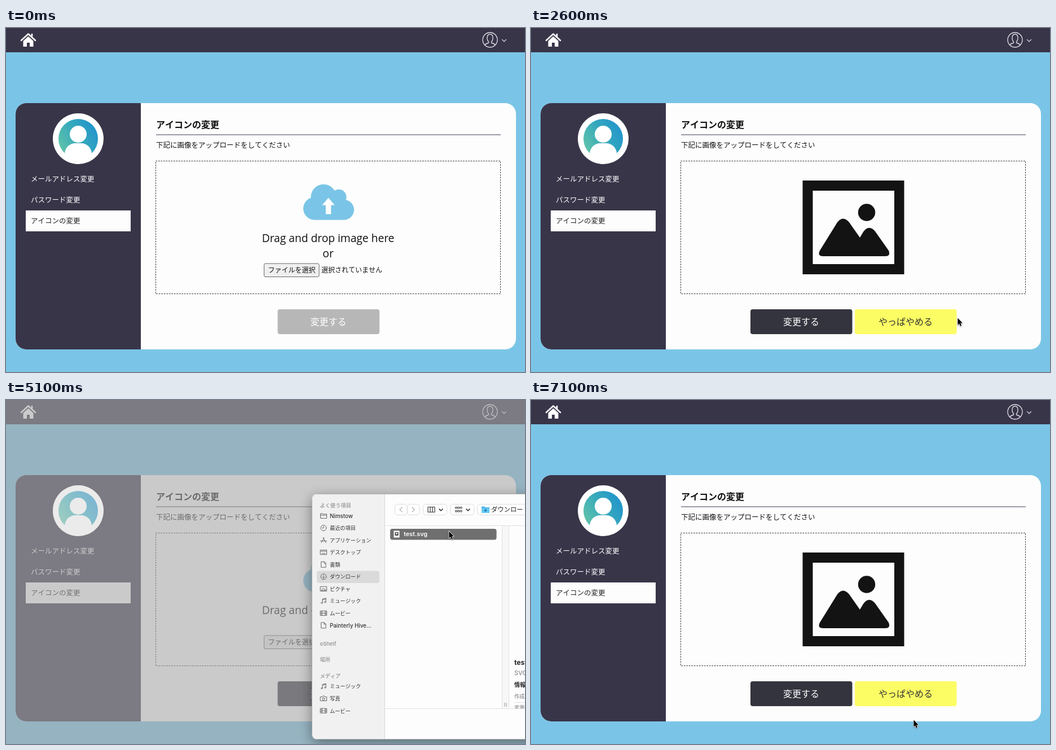
An HTML page with a canvas for the animation above (7.2 s loop, 920 by 609 pixels).

```html
<!DOCTYPE html>
<html lang="ja">
<head>
<meta charset="utf-8">
<title>アイコンの変更</title>
<style>
html, body { margin: 0; width: 920px; height: 609px; overflow: hidden; }
canvas { display: block; }
</style>
</head>
<body>
<canvas id="stage" width="920" height="609"></canvas>
<script>
const LOOP = 7200, STEP = 100;
const INK = '#393549', SKY = '#7ac5e7', PAPER = '#fdfdfd';
const CJK = '"Noto Sans CJK JP", "Noto Sans CJK", sans-serif';
const LATIN = 'Inter, "Noto Sans CJK JP", sans-serif';

const stage = document.getElementById('stage');
const main = stage.getContext('2d');
const sheet = document.createElement('canvas');
sheet.width = 920;
sheet.height = 609;
const sheetCtx = sheet.getContext('2d');
let c = main;

// Pointer route: time, x, y
const route = [
  [900, -20, 340], [1500, 363, 298], [1900, 560, 340], [2600, 756, 513],
  [2800, 700, 518], [3200, 690, 520], [3900, 525, 432], [4100, 519, 429],
  [4400, 519, 429], [4900, 785, 232], [5300, 785, 232], [5800, 925, 575],
  [7000, 681, 584], [7100, 678, 566]
];

const clamp = v => Math.max(0, Math.min(1, v));

function pointerAt(t) {
  let i = 0;
  while (i < route.length - 2 && t > route[i + 1][0]) i++;
  const [t0, x0, y0] = route[i], [t1, x1, y1] = route[i + 1];
  const p = clamp((t - t0) / (t1 - t0)), e = p * p * (3 - 2 * p);
  return [x0 + (x1 - x0) * e, y0 + (y1 - y0) * e];
}

function box(x, y, w, h, r, fill, line) {
  c.beginPath();
  c.roundRect(x, y, w, h, r);
  if (fill) { c.fillStyle = fill; c.fill(); }
  if (line) { c.strokeStyle = line; c.lineWidth = 1; c.stroke(); }
}

function disc(x, y, r, fill) {
  c.beginPath();
  c.arc(x, y, r, 0, 7);
  c.fillStyle = fill;
  c.fill();
}

function shape(d, x, y, fill, line, width = 1, scale = 1) {
  const path = new Path2D(d);
  c.save();
  c.translate(x, y);
  c.scale(scale, scale);
  c.lineJoin = c.lineCap = 'round';
  if (line) { c.strokeStyle = line; c.lineWidth = width; c.stroke(path); }
  if (fill) { c.fillStyle = fill; c.fill(path); }
  c.restore();
}

// y is the vertical middle of the line
function text(s, x, y, size, fill, { weight = 400, align = 'left', font = CJK } = {}) {
  c.font = `${weight} ${size}px ${font}`;
  c.textAlign = align;
  c.fillStyle = fill;
  c.fillText(s, x, y + size * 0.37);
}

function button(label, x, y, fill, ink) {
  box(x, y, 180.5, 44, 4, fill);
  text(label, x + 90, y + 22, 16, ink, { weight: 500, align: 'center' });
}

function header() {
  box(0, 0, 920, 43, 0, INK);
  shape('M1 13L13.5 1.5L26 13M20 2V6', 26, 9, null, '#fff', 2.6);
  shape('M4.5 14L13.5 5.7L22.5 14V24H16V17H11V24H4.5Z', 26, 9, '#fff');
  shape('M13 0A13 13 0 1 1 -13 0A13 13 0 1 1 13 0M-9 8.5Q-7 6.5 -3 5.5Q-2 5 -2.5 3.5Q-5.5 0 -5 -4.5Q-4.5 -10 0 -10Q4.5 -10 5 -4.5Q5.5 0 2.5 3.5Q2 5 3 5.5Q7 6.5 9 8.5',
    858, 21, null, '#e4e2ea', 1.3);
  shape('M0 0L3.5 3.5L7 0', 879.5, 20.5, null, '#d8d6de', 1.2);
}

function avatar(dim) {
  disc(128, 196, 45, '#fff');
  const g = c.createLinearGradient(97, 215, 158, 178);
  g.addColorStop(0, '#5fc2aa');
  g.addColorStop(0.55, '#35a8bd');
  g.addColorStop(1, '#2396cb');
  disc(128, 196, 35, g);
  disc(128, 188, 15, '#fff');
  box(104, 204, 48, 29, [19, 19, 0, 0], '#fff');
  if (dim) disc(128, 196, 45, `rgba(215,215,215,${dim * 0.5})`);
}

function sidebar(bottom) {
  box(17, 133, 222, bottom - 133, [19, 0, 0, 19], INK);
  text('メールアドレス変更', 44, 267, 12.5, '#fff', { weight: 500 });
  text('パスワード変更', 44, 304, 12.5, '#fff', { weight: 500 });
  box(35, 323, 186, 37, 0, PAPER);
  text('アイコンの変更', 44, 341, 12.5, '#222');
}

function dropZone(over) {
  c.save();
  c.setLineDash(over ? [6, 3] : [2.7, 1.8]);
  c.strokeStyle = over ? '#d8edf9' : '#333';
  c.lineWidth = over ? 3 : 1;
  if (over) c.strokeRect(266.5, 236.5, 609.5, 236);
  else c.strokeRect(265.5, 235.5, 611, 235);
  c.restore();
}

function uploadPrompt(dy, hover) {
  shape('M537.6 226.6c4.1-10.7 6.4-22.4 6.4-34.6 0-53-43-96-96-96-19.7 0-38.1 6-53.3 16.2C367 64.2 315.3 32 256 32c-88.4 0-160 71.6-160 160 0 2.7.1 5.4.2 8.1C40.2 219.8 0 273.2 0 336c0 79.5 64.5 144 144 144h368c70.7 0 128-57.3 128-128 0-61.9-44-113.6-102.4-125.4z',
    527, 272.3 + dy, SKY, null, 1, 0.1406);
  shape('M0 0L11 13H4.7V29H-4.7V13H-11Z', 571.5, 300.5 + dy, '#fff');
  const opts = { align: 'center', font: '"Open Sans", "Noto Sans", sans-serif' };
  text('Drag and drop image here', 571, 372 + dy, 19.2, '#111', opts);
  text('or', 571, 399 + dy, 19.2, '#111', opts);
  box(457.5, 417 + dy, 97.5, 23.5, 2.5, hover ? '#dedede' : '#efefef', '#666');
  text('ファイルを選択', 506.5, 428.5 + dy, 12, '#111', { align: 'center' });
  text('選択されていません', 559, 428.5 + dy, 12, '#111');
}

function preview() {
  box(481.5, 270, 180, 166, 0, '#131313');
  box(499.5, 288, 144.5, 130, 0, PAPER);
  disc(595, 326.5, 15.2, '#131313');
  shape('M512 394L543 344Q553 331 564 344L583 371L589 361Q599 347 610 360L634 394Q638 404 628 404H518Q507 404 512 394Z', 0, 0, '#131313');
}

const icons = {
  folder: 'M-5.5 4V-4H-2L-1 -3H5.5V4ZM-5.5 -1H5.5',
  clock: 'M5 0A5 5 0 1 1 -5 0A5 5 0 1 1 5 0M0 -3V0H-2.5',
  app: 'M-4 4.5L0.8 -4.5M4 4.5L-0.8 -4.5M-5.5 1.5H5.5',
  desk: 'M-5.5 -4H5.5V4H-5.5ZM-5.5 -2H5.5M-3 2H3',
  doc: 'M-4 -5H1L4 -2V5H-4ZM1 -5V-2H4',
  down: 'M5 0A5 5 0 1 1 -5 0A5 5 0 1 1 5 0M0 -2.5V2.5M-2 0.7L0 2.7L2 0.7',
  pic: 'M-5.5 -4H5.5V4H-5.5ZM-4 2.5L-1 -1L1 1L2.5 0L4 2.5Z',
  music: 'M-2 3.5V-3.5L4 -5V2M-2 3.5A1.3 1.2 0 1 1 -2 3.4M4 2A1.3 1.2 0 1 1 4 1.9M-2 -2L4 -3.5',
  film: 'M-5.5 -4H5.5V4H-5.5ZM-3 -4V4M3 -4V4M-3 0H3M-5.5 -1.4H-3M-5.5 1.4H-3M3 -1.4H5.5M3 1.4H5.5',
  camera: 'M-5.5 -3H-2.5L-1.5 -4.5H1.5L2.5 -3H5.5V4H-5.5ZM2.2 0.5A2.2 2.2 0 1 1 -2.2 0.5A2.2 2.2 0 1 1 2.2 0.5'
};
const places = [
  ['folder', 'Nimstow'], ['clock', '最近の項目'], ['app', 'アプリケーション'],
  ['desk', 'デスクトップ'], ['doc', '書類'], ['down', 'ダウンロード'],
  ['pic', 'ピクチャ'], ['music', 'ミュージック'], ['film', 'ムービー'],
  ['doc', 'Painterly Hive...']
];
const media = [['music', 'ミュージック'], ['camera', '写真'], ['film', 'ムービー']];

function fileIcon(x, y) {
  box(x, y, 10, 12, 1, '#fff', '#bbb');
  box(x + 2, y + 2.5, 6, 6, 0, '#444');
  disc(x + 5, y + 5, 1.4, '#fff');
}

function dialog(selected, closing) {
  c = sheetCtx;
  c.clearRect(0, 0, 920, 609);
  c.save();
  c.shadowColor = 'rgba(0,0,0,.4)';
  c.shadowBlur = 22;
  c.shadowOffsetY = 6;
  box(542, 166, 440, 435, 9, '#fff');
  c.restore();
  box(542.5, 166.5, 440, 434, 9, '#fdfdfd', '#b5b5b5');
  box(543, 167, 128, 433, [8, 0, 0, 8], '#f1f1f1');
  box(671, 167, 1, 433, 0, '#d8d8d8');

  const head = (s, y) => text(s, 556.5, y, 9.2, '#a2a2a2', { weight: 700, font: LATIN });
  const rows = (list, top) => list.forEach(([icon, label], i) => {
    const y = top + i * 21.55;
    shape(icons[icon], 563, y, null, closing ? '#000' : '#666', closing ? 1.3 : 1);
    const cjk = label.charCodeAt(0) > 255;
    text(label, 574, y, cjk ? 9.2 : 9.8, '#333', { weight: 500, font: LATIN });
  });
  box(551, 302.5, 111, 21.5, 4, '#dadada');
  head('よく使う項目', 187);
  rows(places, 205);
  head('oShelf', 432);
  head('場所', 460);
  head('メディア', 488.5);
  rows(media, 507);

  // Toolbar
  [[689, 21.5], [711, 21.5], [739, 42], [787, 42], [835, 130]].forEach(([x, w]) =>
    box(x + 0.5, 184.5, w, 19, 5, '#fff', '#dcdcdc'));
  shape('M3 -4L-1 0L3 4', 699, 194, null, '#b0b0b0', 1.2);
  shape('M-2 -4L2 0L-2 4', 722, 194, null, '#b0b0b0', 1.2);
  shape('M-6 -4.5H6V4.5H-6ZM-2 -4.5V4.5M2 -4.5V4.5', 754, 194, null, '#333', 1.2);
  for (let i = 0; i < 3; i++) {
    box(796.5 + i * 4.3, 189.5, 3, 2.5, 0, null, '#444');
    box(796.5 + i * 4.3, 195.5, 3, 2.5, 0, null, '#444');
  }
  for (const x of [771, 819]) shape('M-3 -1.5L0 1.5L3 -1.5', x, 194.5, null, '#222', 1.5);
  shape('M0 1H5L6.5 2.5H14V12H0Z', 843, 187.5, '#4bb4e8');
  box(843, 191.5, 14, 8.5, 1, '#68c9f5');
  disc(850, 195.5, 2.3, '#2487bd');
  text('ダウンロード', 860, 194, 11.3, '#222', { weight: 500 });
  box(672, 222, 250, 1, 0, '#e1e1e1');

  // Columns
  box(879, 223, 13, 323, 0, '#f7f7f7');
  box(879, 223, 1, 323, 0, '#e2e2e2');
  box(891, 223, 1, 323, 0, '#e2e2e2');
  box(883.5, 536, 1, 7, 0, '#999');
  box(886.5, 536, 1, 7, 0, '#999');
  if (selected) {
    box(681, 228, 188.5, 19.5, 4, '#6f6f6f');
    c.save();
    c.beginPath();
    c.rect(892, 223, 28, 323);
    c.clip();
    text('test.svg', 901, 464.5, 12, '#222', { weight: 700, font: LATIN });
    text('SVG書類', 901, 482.5, 11, '#777', { font: LATIN });
    text('情報', 901, 504.5, 10, '#222', { weight: 700 });
    text('作成日', 901, 524.5, 9.2, '#777', { weight: 500 });
    box(901, 535, 30, 1, 0, '#ddd');
    text('変更日', 901, 545, 9.2, '#777', { weight: 500 });
    c.restore();
  }
  fileIcon(687.5, 231.5);
  text('test.svg', 705, 237.5, 10.8, selected ? '#fff' : '#222', { weight: 600, font: LATIN });
  box(672, 546, 250, 1, 0, '#e1e1e1');
  c = main;
}

function pointer(x, y) {
  c.save();
  c.shadowColor = 'rgba(0,0,0,.3)';
  c.shadowBlur = 2;
  c.shadowOffsetY = 1;
  shape('M0.5 0.5V12.5L3.2 10L5.1 14.5L7 13.7L5.1 9.3H8.8Z', x, y, '#000', '#fff', 1.8);
  c.restore();
}

function draggedFile(x, y, copy) {
  c.save();
  c.globalAlpha = 0.55;
  fileIcon(x - 64.5, y - 11.5);
  c.restore();
  box(x - 52, y - 12.5, 55.5, 14.5, 7, '#7c7c7c');
  text('test.svg', x - 48, y - 5, 10.8, '#fff', { weight: 600, font: LATIN });
  if (!copy) return;
  disc(x + 8.5, y + 20.5, 9, '#e8efe6');
  disc(x + 8.5, y + 20.5, 8.3, '#2b931b');
  shape('M-4 0H4M0 -4V4', x + 8.5, y + 20.5, null, '#fff', 2);
}

function draw(t) {
  const [px, py] = pointerAt(t);
  const dragging = t >= 900 && t < 1900;
  const over = dragging && px > 266;
  const filled = (t >= 1900 && t < 3200) || t >= 6500;
  const fade = Math.min(clamp((t - 4300) / 200), clamp((6270 - t) / 270));
  const dim = fade * (t > 6000 ? 1.03 : 1);
  const bottom = over ? 572 : 569;

  c = main;
  box(0, 0, 920, 609, 0, SKY);
  header();
  box(17, 133, 887, bottom - 133, 19, PAPER);
  sidebar(bottom);
  text('アイコンの変更', 266, 171.5, 16, '#111', { weight: 700 });
  box(266, 188.5, 611, 1, 0, '#3b3955');
  text('下記に画像をアップロードをしてください', 266, 207, 12.5, '#111');
  dropZone(over);
  if (filled) {
    preview();
    button('変更する', 389, 498, '#34343e', '#fff');
    button('やっぱやめる', 574, 498, '#fcfc64', '#333');
  } else {
    const hover = t < 4400 && px > 457 && px < 555 && py > 416 && py < 441;
    uploadPrompt(over ? 2 : 0, hover);
    button('変更する', 481.5, over ? 501.5 : 498, t < 1900 ? '#b7b7b7' : '#34343e', '#fff');
  }
  if (dim > 0) box(0, 0, 920, 609, 0, `rgba(168,168,168,${Math.min(dim, 1) * 0.6})`);
  avatar(Math.min(dim, 1));

  if (fade > 0) {
    const closing = t >= 6000;
    dialog(t >= 4900, closing);
    c.globalAlpha = fade;
    c.drawImage(sheet, 0, closing ? -(1 - fade) * 27 : 0);
    c.globalAlpha = 1;
  }
  if (dragging) draggedFile(px, py, over);
  if ((t >= 900 && t < 5800) || t >= 7000) pointer(px, py);
}

function tick(now) {
  draw(Math.floor((now % LOOP) / STEP) * STEP);
  requestAnimationFrame(tick);
}
requestAnimationFrame(tick);
</script>
</body>
</html>
```
